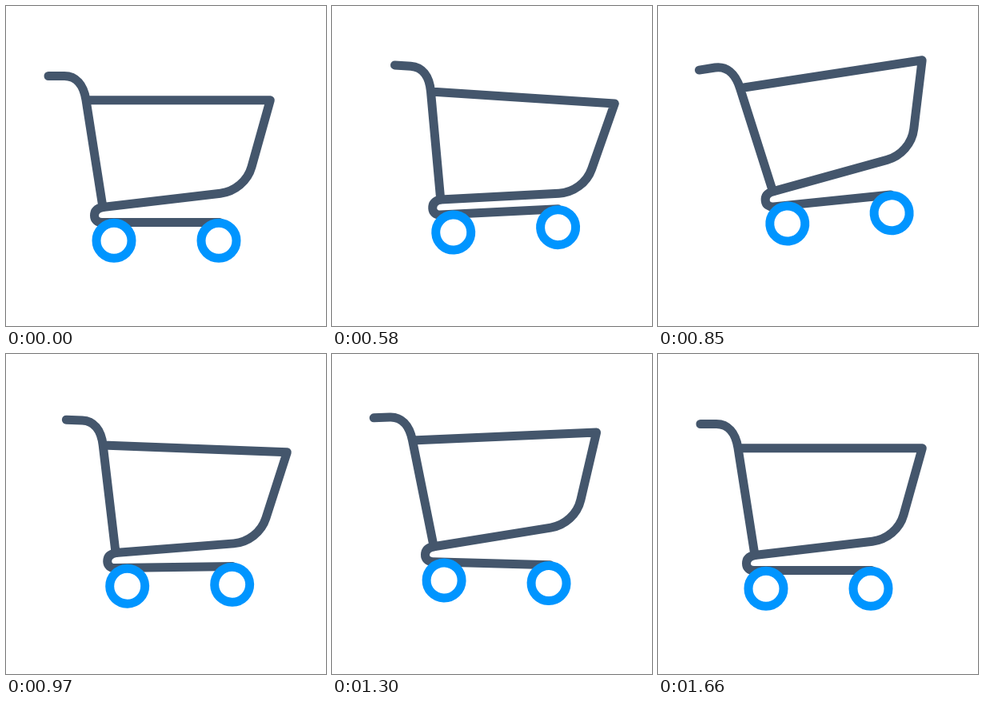
These frames come from a looping animation (400x400 px, 1720 ms). An HTML page with a canvas:

```html
<!DOCTYPE html>
<html lang="en">
<head>
<meta charset="utf-8">
<title>Shopping cart</title>
<style>
  html, body { margin: 0; width: 100%; height: 100%; overflow: hidden; background: #fff; }
  canvas { display: block; width: 100vmin; height: 100vmin; }
</style>
</head>
<body>
<canvas id="stage" width="400" height="400"></canvas>
<script>
const ctx = document.getElementById('stage').getContext('2d');
const LOOP = 1720, START = 430, STEP = 30, END = 1660;
const FRAME = '#44566c', WHEEL = '#0095ff';
const AXLE = { x: 200.5, y: 293.3 };   // midpoint between the wheels
const HINGE = { x: 121, y: 252 };      // where the basket tilts on the chassis

const linear = u => u;
const smooth = u => u * u * (3 - 2 * u);
const quadIn = u => u * u;
const quadOut = u => u * (2 - u);
const mix = (a, b, k) => a + (b - a) * k;
const rise = u => mix(smooth(u), quadOut(u), 0.35);
const fall = u => mix(smooth(u), quadIn(u), 0.35);
const settle = power => u => 1 - Math.pow(1 - smooth(u), power);

// Each key: [time, value, easing used to arrive there]
const tracks = {
  x: [[500, 0], [750, 31, quadOut], [1000, 15, fall], [1150, 7.5, smooth], [1650, 0, settle(1.6)]],
  y: [[500, 0], [750, -39, rise], [1000, 0, fall], [1150, -12.6, rise], [1650, 0, settle(1.6)]],
  roll: [[500, 0], [750, -8.1, rise], [1000, 0, fall], [1150, 3.05, rise], [1460, 0, smooth]],
  tilt: [[400, 0], [500, 10, linear], [750, -4.5, smooth], [1010, 6, quadIn],
         [1180, -5.8, quadOut], [1650, 0, settle(2)]]
};

function valueAt(keys, t) {
  if (t <= keys[0][0]) return keys[0][1];
  for (let i = 1; i < keys.length; i++) {
    const [t0, v0] = keys[i - 1], [t1, v1, ease] = keys[i];
    if (t < t1) return mix(v0, v1, ease((t - t0) / (t1 - t0)));
  }
  return keys[keys.length - 1][1];
}

function rotateAbout(p, degrees) {
  ctx.translate(p.x, p.y);
  ctx.rotate(degrees * Math.PI / 180);
  ctx.translate(-p.x, -p.y);
}

const chassis = new Path2D('M121 251.5 C113 253 110.5 257 110.5 262 C110.5 267 114 270.5 120 270.5 H267');
const basket = new Path2D('M53 87.5 H73 C87 87.5 97 98 100 117.5 L121 251.5 L268 234.2 ' +
  'C286 232 302 219 307 201 L330.3 117.7 H100');

function drawWheel(x) {
  ctx.beginPath();
  ctx.arc(x, AXLE.y, 22, 0, Math.PI * 2);
  ctx.fillStyle = '#fff';
  ctx.fill();
  ctx.strokeStyle = WHEEL;
  ctx.stroke();
}

function draw(t) {
  ctx.fillStyle = '#fff';
  ctx.fillRect(0, 0, 400, 400);
  ctx.save();
  ctx.translate(valueAt(tracks.x, t), valueAt(tracks.y, t));
  rotateAbout(AXLE, valueAt(tracks.roll, t));
  ctx.lineWidth = 11;
  ctx.lineCap = ctx.lineJoin = 'round';
  ctx.strokeStyle = FRAME;
  ctx.stroke(chassis);

  ctx.save();
  rotateAbout(HINGE, valueAt(tracks.tilt, t));
  ctx.stroke(basket);
  ctx.restore();

  drawWheel(AXLE.x - 65.5);
  drawWheel(AXLE.x + 65.5);
  ctx.restore();
}

function tick() {
  const t = performance.now() % LOOP;
  const stepped = START + Math.floor((t - START) / STEP) * STEP;
  draw(t < START ? 0 : Math.min(stepped, END));
  requestAnimationFrame(tick);
}
tick();
</script>
</body>
</html>
```
